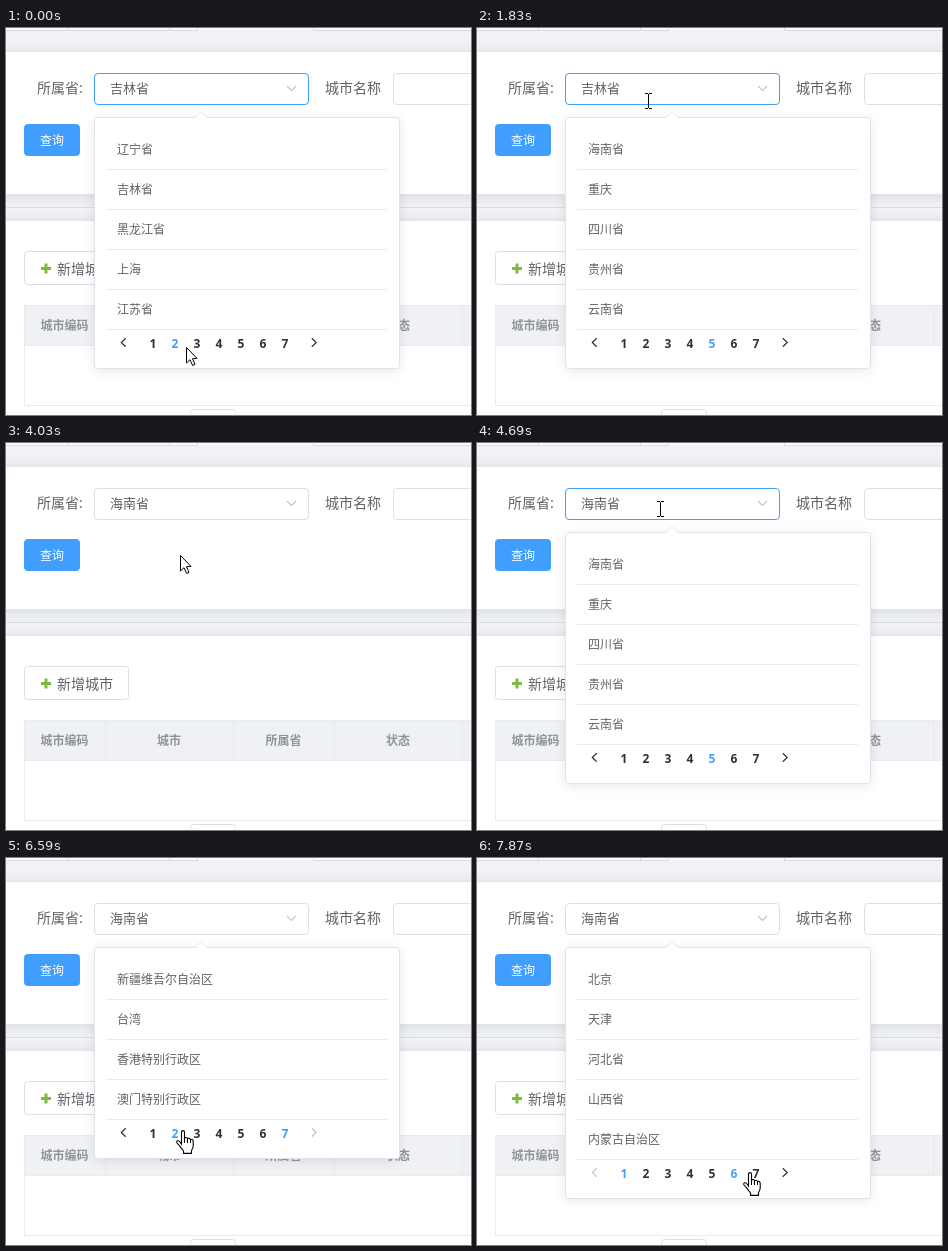
Write an HTML page with a canvas that moves like this. It is 465 px wide and 387 px high and loops after 7.99 s.

```html
<!DOCTYPE html>
<html lang="zh-CN">
<head>
<meta charset="utf-8">
<title>省份选择</title>
<style>
html, body { margin: 0; width: 100%; height: 100%; overflow: hidden; background: #fff; }
canvas { display: block; width: 465px; height: 387px; }
</style>
</head>
<body>
<canvas id="stage"></canvas>
<script>
const W = 465, H = 387, LOOP = 7990, PAGE_SIZE = 5;
const BLUE = '#409eff', DARK = '#303133', TEXT = '#606266', MUTED = '#909399';
const PALE = '#c0c4cc', BORDER = '#dcdfe6', LINE = '#e8ebf0';
const CJK = '"Noto Sans CJK SC", "Noto Sans CJK", sans-serif';
const LATIN = '"Open Sans", sans-serif';

const provinces = ('北京 天津 河北省 山西省 内蒙古自治区 辽宁省 吉林省 黑龙江省 上海 江苏省 ' +
  '浙江省 安徽省 福建省 江西省 山东省 河南省 湖北省 湖南省 广东省 广西壮族自治区 ' +
  '海南省 重庆 四川省 贵州省 云南省 西藏自治区 陕西省 甘肃省 青海省 宁夏回族自治区 ' +
  '新疆维吾尔自治区 台湾 香港特别行政区 澳门特别行政区').split(' ');
const PAGES = Math.ceil(provinces.length / PAGE_SIZE);

// time, cursor, left, top, state change
const steps = [
  [0, 'arrow', 180, 319, { page: 2, focus: true, value: '吉林省', alpha: 1 }],
  [130, 'hand', 222, 315],
  [260, 'hand', 293, 315],
  [400, 'hand', 293, 314, { page: 3, focus: false }],
  [540, 'hand', 293, 313, { page: 4 }],
  [670, 'hand', 293, 313, { page: 5 }],
  [980, 'arrow', 194, 154],
  [1130, 'arrow', 184, 98],
  [1260, 'beam', 172, 60],
  [1400, 'beam', 168, 60],
  [1550, 'beam', 168, 60, { focus: true }],
  [1830, 'beam', 168, 65],
  [3260, 'arrow', 183, 101],
  [3380, 'arrow', 176, 112],
  [3530, 'arrow', 172, 121],
  [3660, 'arrow', 172, 121, { focus: false, value: '海南省' }],
  [3800, 'arrow', 172, 121, { alpha: 0.4 }],
  [3930, 'arrow', 174, 112, { alpha: 0 }],
  [4100, 'arrow', 179, 88],
  [4270, 'beam', 180, 58],
  [4420, 'beam', 180, 58, { focus: true }],
  [4540, 'beam', 180, 58, { alpha: 0.6 }],
  [4690, 'beam', 180, 58, { alpha: 1 }],
  [4810, 'arrow', 198, 118],
  [4950, 'arrow', 222, 196],
  [5090, 'arrow', 243, 272],
  [5220, 'hand', 249, 317],
  [5350, 'hand', 251, 319],
  [5470, 'hand', 251, 319, { focus: false }],
  [5600, 'hand', 251, 319, { page: 6 }],
  [5750, 'hand', 266, 318],
  [5900, 'hand', 274, 318],
  [6050, 'hand', 274, 318, { page: 7 }],
  [6190, 'arrow', 246, 308],
  [6330, 'arrow', 204, 292],
  [6470, 'hand', 168, 281],
  [6590, 'hand', 170, 272],
  [6870, 'arrow', 176, 272, { page: 2 }],
  [7000, 'arrow', 168, 286],
  [7150, 'arrow', 155, 303],
  [7290, 'hand', 143, 318],
  [7440, 'hand', 140, 316],
  [7720, 'hand', 140, 316, { page: 1 }],
  [7870, 'hand', 266, 314]
];

const canvas = document.getElementById('stage');
const ctx = canvas.getContext('2d');
const ratio = window.devicePixelRatio || 1;
canvas.width = W * ratio;
canvas.height = H * ratio;

function rect(x, y, w, h, color) {
  ctx.fillStyle = color;
  ctx.fillRect(x, y, w, h);
}

function box(x, y, w, h, r, fill, stroke) {
  ctx.beginPath();
  ctx.roundRect(x + 0.5, y + 0.5, w - 1, h - 1, r);
  ctx.fillStyle = fill;
  ctx.fill();
  if (!stroke) return;
  ctx.strokeStyle = stroke;
  ctx.lineWidth = 1;
  ctx.stroke();
}

function shadowed(draw) {
  ctx.save();
  ctx.shadowColor = 'rgba(0,0,0,0.1)';
  ctx.shadowBlur = 12 * ratio;
  ctx.shadowOffsetY = 2 * ratio;
  draw();
  ctx.restore();
}

// y is the visual middle of the line
function text(str, x, y, size, color, { align = 'left', weight = 400, family = CJK } = {}) {
  ctx.font = `${weight} ${size}px ${family}`;
  ctx.textAlign = align;
  ctx.fillStyle = color;
  ctx.fillText(str, x, Math.round(y + size * 0.38));
}

function path(points, color, width, close, fill) {
  ctx.beginPath();
  points.forEach(([x, y]) => ctx.lineTo(x, y));
  if (close) ctx.closePath();
  if (fill) {
    ctx.fillStyle = fill;
    ctx.fill();
  }
  ctx.strokeStyle = color;
  ctx.lineWidth = width;
  ctx.stroke();
}

function drawPage(state) {
  rect(0, 0, W, H, '#f0f2f5');
  rect(0, 0, W, 2, '#fafbfc');
  rect(0, 2, 192, 1, '#d8dce5');
  rect(307, 2, W - 307, 1, '#d8dce5');
  [61, 163, 191, 307].forEach(x => rect(x, 0, 1, 3, '#d8dce5'));

  shadowed(() => rect(-20, 23, W + 40, 144, '#fff'));
  rect(0, 23, W, 1, '#e2e5eb');
  rect(0, 166, W, 1, '#e2e5eb');
  rect(0, 179, W, 1, '#d8dce3');
  shadowed(() => rect(-20, 192, W + 40, H, '#fff'));
  rect(0, 192, W, 1, '#e2e5eb');

  text('所属省:', 31, 60, 14, TEXT);
  box(88, 45, 215, 32, 3.5, '#fff', state.focus ? BLUE : BORDER);
  text(state.value, 104, 60, 13, TEXT);
  path([[281, 58], [285.5, 62.5], [290, 58]], PALE, 1.1);
  text('城市名称', 319, 60, 14, TEXT);
  box(387, 45, 215, 32, 3.5, '#fff', BORDER);

  box(18, 96, 56, 32, 3, BLUE, BLUE);
  text('查询', 34, 112, 12, '#fff', { weight: 500 });

  box(18, 223, 105, 34, 3, '#fff', BORDER);
  rect(35, 239, 10, 3, '#7dbb3c');
  rect(38.5, 235.5, 3, 10, '#7dbb3c');
  text('新增城市', 51, 240.5, 14, TEXT);
  drawTable();
}

function drawTable() {
  rect(18, 277, W, 41, '#eff1f4');
  rect(18, 277, W, 1, LINE);
  rect(18, 317, W, 1, LINE);
  rect(18, 277, 1, 101, LINE);
  rect(18, 377, W, 1, LINE);
  const edges = [18, 99, 227, 328, 456];
  edges.slice(1).forEach(x => rect(x, 278, 1, 39, '#e6e9ee'));
  ['城市编码', '城市', '所属省', '状态'].forEach((name, i) =>
    text(name, (edges[i] + edges[i + 1]) / 2, 297.5, 12, MUTED, { align: 'center', weight: 700 }));
  box(184, 381, 46, 28, 3, '#fff', BORDER);
}

function drawPopup(state, hover) {
  if (!state.alpha) return;
  const items = provinces.slice((state.page - 1) * PAGE_SIZE, state.page * PAGE_SIZE);
  const bottom = 101 + items.length * 40;

  ctx.save();
  ctx.globalAlpha = state.alpha;
  shadowed(() => box(88, 89, 306, bottom - 89 + 40, 3.5, '#fff'));
  box(88, 89, 306, bottom - 89 + 40, 3.5, '#fff', '#e0e4ea');
  path([[189, 89.5], [195, 83.5], [201, 89.5]], '#e4e7ed', 1, false, '#fff');
  rect(190, 89, 10, 1, '#fff');

  items.forEach((name, i) => {
    text(name, 111, 121.5 + i * 40, 12, TEXT);
    rect(100, 141 + i * 40, 281, 1, LINE);
  });
  drawPager(state.page, hover, bottom + 13.5);
  ctx.restore();
}

function drawPager(page, hover, y) {
  const arrow = (x, dir, off, hot) =>
    path([[x - dir * 2.2, y - 4.3], [x + dir * 2.2, y], [x - dir * 2.2, y + 4.3]],
      off ? PALE : hot ? BLUE : DARK, 1.2);
  arrow(117.5, -1, page === 1, hover === 0);
  arrow(308, 1, page === PAGES, hover === PAGES + 1);
  for (let n = 1; n <= PAGES; n++) {
    const color = n === page || n === hover ? BLUE : DARK;
    text(n, 125 + n * 22, y + 0.5, 12, color, { align: 'center', weight: 700, family: LATIN });
  }
}

const cursors = {
  arrow() {
    path([[0.5, 0.5], [0.5, 16], [4, 12.7], [6.6, 18.5], [9, 17.4], [6.5, 11.7], [11, 11.4]],
      '#000', 1, true, '#fff');
  },
  beam() {
    rect(0, 0, 3, 1, '#000');
    rect(4, 0, 3, 1, '#000');
    rect(3, 1, 1, 14, '#000');
    rect(0, 15, 3, 1, '#000');
    rect(4, 15, 3, 1, '#000');
  },
  hand() {
    const outline = new Path2D('M5.5 14V2.2Q5.5.6 7 .6T8.5 2.2V8.5Q8.8 7.3 10.2 7.5T11.5 9' +
      'Q12 8 13.2 8.3T14.5 10Q15 9.2 16.1 9.6T17.2 11.5V16Q17.2 18 15.5 20.5V23.4H7.5V21' +
      'Q5.5 18.5 3.8 16.2L1 13Q.2 11.3 1.7 10.8T4 12Z');
    ctx.fillStyle = '#fff';
    ctx.fill(outline);
    ctx.strokeStyle = '#000';
    ctx.lineWidth = 1.1;
    ctx.stroke(outline);
    [[8.5, 8.5], [11.5, 9], [14.5, 10]].forEach(([x, top]) => path([[x, top], [x, 13]], '#000', 1));
  }
};

function stateAt(time) {
  const state = {};
  for (const [start, cursor, x, y, change] of steps) {
    if (start > time) break;
    Object.assign(state, { cursor, x, y }, change);
  }
  return state;
}

function frame(now) {
  const state = stateAt(now % LOOP);
  const hover = state.cursor === 'hand' ? Math.floor((state.x - 113) / 22) : -1;
  ctx.setTransform(ratio, 0, 0, ratio, 0, 0);
  drawPage(state);
  drawPopup(state, hover);
  ctx.translate(state.x, state.y);
  cursors[state.cursor]();
  requestAnimationFrame(frame);
}

let origin;
requestAnimationFrame(function start(now) {
  origin = now;
  frame(0);
});
</script>
</body>
</html>
```
